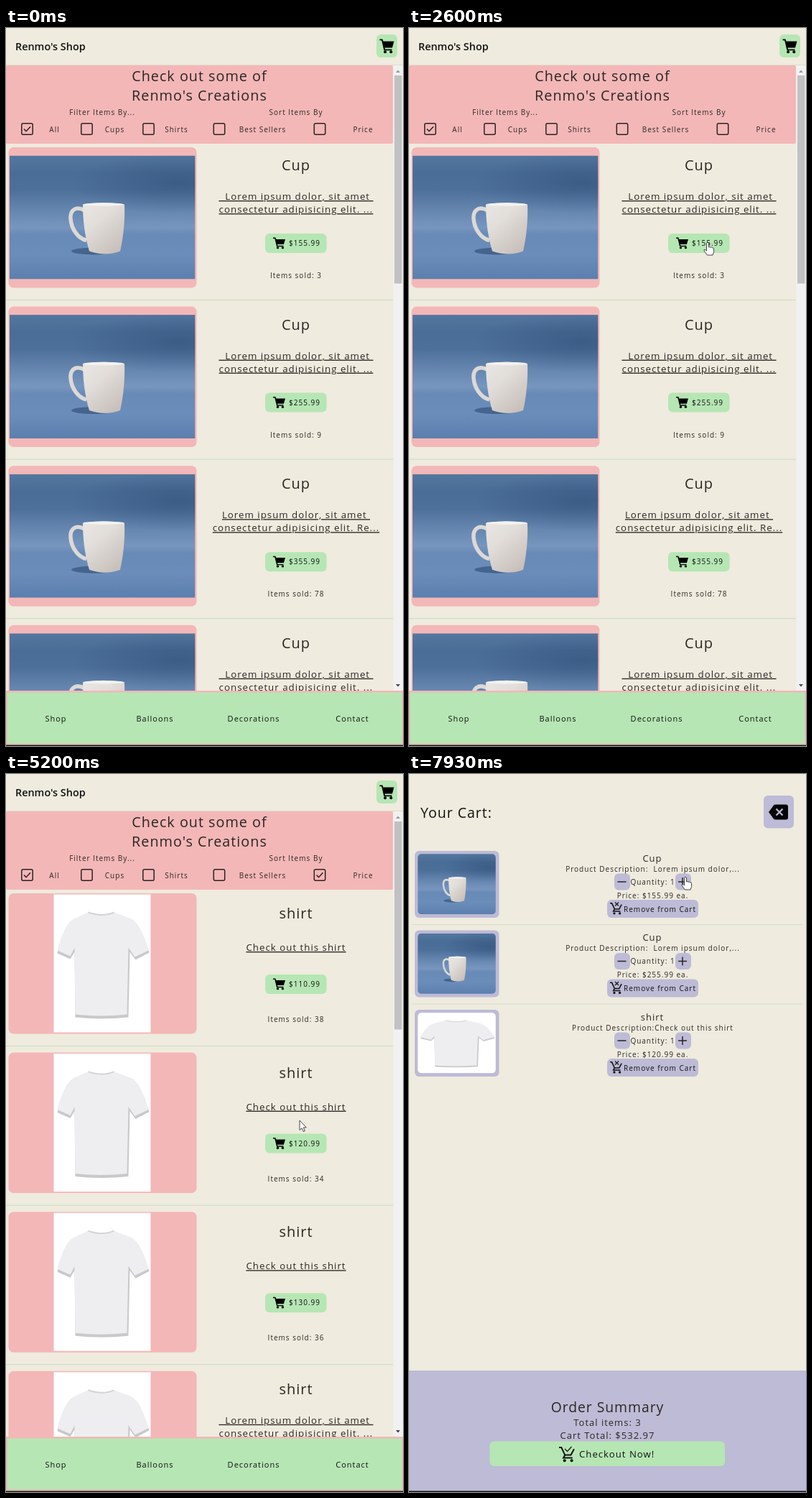
Write an HTML page that moves like this. It is 553 px wide and 999 px high and loops after 8 s.

```html
<!DOCTYPE html>
<html lang="en">
<head>
<meta charset="utf-8">
<title>Shop</title>
<style>
html, body { margin: 0; height: 100%; overflow: hidden; background: #efebde; }
svg { display: block; width: 100vw; height: 100vh; }
text { font-family: "Open Sans", "Noto Sans", sans-serif; fill: #2b2623; letter-spacing: 1px; white-space: pre; }
.u { text-decoration: underline; }
.dark { fill: #111; }
.line { fill: none; stroke: #2c2323; stroke-width: 1.5; }
</style>
</head>
<body>
<svg id="stage" viewBox="0 0 553 999" preserveAspectRatio="none">
  <defs>
    <linearGradient id="wall" x1="0" y1="0" x2="0" y2="1">
      <stop offset="0" stop-color="#54779f"/>
      <stop offset=".14" stop-color="#4a6d97"/>
      <stop offset=".28" stop-color="#4d709a"/>
      <stop offset=".45" stop-color="#6687b0"/>
      <stop offset=".58" stop-color="#7796bf"/>
      <stop offset=".64" stop-color="#688ab6"/>
      <stop offset=".8" stop-color="#6b8dba"/>
      <stop offset="1" stop-color="#5b7fae"/>
    </linearGradient>
    <radialGradient id="shade">
      <stop offset="0" stop-color="#27476f" stop-opacity=".45"/>
      <stop offset="1" stop-color="#27476f" stop-opacity="0"/>
    </radialGradient>
    <linearGradient id="mug" x2=".7" y2="1">
      <stop offset="0" stop-color="#e9e7e4"/>
      <stop offset=".4" stop-color="#e2deda"/>
      <stop offset="1" stop-color="#c8c0bb"/>
    </linearGradient>
    <clipPath id="photoEdge"><rect width="258.5" height="172"/></clipPath>

    <g id="cupPhoto" clip-path="url(#photoEdge)">
      <rect width="258.5" height="172" fill="url(#wall)"/>
      <ellipse cx="235" cy="38" rx="150" ry="42" fill="url(#shade)"/>
      <ellipse cx="118" cy="133" rx="32" ry="5" fill="#2c4a72" opacity=".6"/>
      <path d="M104 76C92 70 84 76 85 88c1 14 10 27 22 30" fill="none" stroke="#dcd9d6" stroke-width="5.5"/>
      <path d="M102 68q29-5 58 0c1 24-2 48-6 65q-20 8-43 0c-6-20-9-42-9-65z" fill="url(#mug)"/>
      <ellipse cx="131" cy="68" rx="28.5" ry="2.2" fill="#f3f2f0"/>
    </g>

    <g id="shirtPhoto">
      <rect width="135" height="192" fill="#fff"/>
      <path d="M48 26Q68 33 84 26L108 35C119 41 127 60 133 80L114 90 106 79 104 170Q66 174 30 170L29 79 23 89 5 81C10 60 17 41 28 35z" fill="#c9c9cc" transform="translate(0 1)"/>
      <path d="M48 25Q68 32 84 25L108 34C119 40 127 59 132 78L113 87 104 74 102 167Q66 171 30 167L29 74 23 86 5 78C10 59 17 40 28 34z" fill="#eeeef0"/>
      <path d="M48 25Q68 32 84 25" fill="none" stroke="#d4d4d8" stroke-width="2"/>
    </g>

    <g id="cart">
      <path d="M0 0h4l1 3h15l-2.5 9H7l.5 2H17v1.8H6L2.7 1.8H0z"/>
      <circle cx="7.6" cy="17.8" r="2"/><circle cx="15.8" cy="17.8" r="2"/>
    </g>

    <g id="cartLine" fill="none" stroke="#111" stroke-width="1.8">
      <path d="M0 1h3l4.5 9.5H15L19 3M7.5 10.5L5.5 14H17"/>
      <circle cx="7" cy="17.5" r="1"/><circle cx="16" cy="17.5" r="1"/>
    </g>
    <clipPath id="list"><rect y="51" width="553" height="872"/></clipPath>
  </defs>
  <g id="shop"></g>
  <g id="panel"></g>
  <rect y="997.5" width="553" height="1.5" fill="#111"/>
  <g id="pointer" stroke="#333" stroke-width=".9" fill="#fff" stroke-linejoin="round">
    <path id="arrow" d="M0 0v13.5l3.1-2.8 2.1 4.8 2.2-1-2.1-4.6h4z"/>
    <path id="hand" d="M-1.5 1.2Q0-.8 1.5 1.2V7Q3 5.8 4 7.3 5.5 6.3 6.4 7.9 8.3 7 8.6 9.3V13.5L7 18H-.5L-5 12Q-5.3 9.7-3 10.6L-1.5 12z"/>
  </g>
</svg>

<script>
const $ = id => document.getElementById(id);
const GREEN = '#b6e6b4', PINK = '#f3b7b7', LILAC = '#bdbbd6', CREAM = '#efebde';
const PITCH = 221.6;

const rect = (x, y, w, h, fill, r = 0) =>
  `<rect x="${x}" y="${y}" width="${w}" height="${h}" rx="${r}" fill="${fill}"/>`;
const text = (x, y, s, size = 10, attrs = '') =>
  `<text x="${x + .5}" y="${y}" font-size="${size}" text-anchor="middle" ${attrs}>${s}</text>`;
const left = (x, y, s, size, attrs = '') =>
  `<text x="${x}" y="${y}" font-size="${size}" ${attrs}>${s}</text>`;
const use = (id, x, y, sx = 1, sy = sx) =>
  `<use href="#${id}" transform="translate(${x} ${y}) scale(${sx} ${sy})"/>`;
const path = d => `<path class="line" d="${d}"/>`;

function blurb(y, long) {
  const sp = '\u00a0';
  const first = (long ? '' : sp + sp) + 'Lorem ipsum dolor, sit amet' + sp;
  const second = 'consectetur adipisicing elit. ' + (long ? 'Re...' : '...');
  return text(403.5, y, first, 13.3, 'class="u"') + text(403.5, y + 18, second, 13.3, 'class="u"');
}

function item(i, kind, price, sold, short) {
  const photo = kind === 'Cup' ? use('cupPhoto', 5, 11.5) : use('shirtPhoto', 66.5, 1.5);
  const buy = short ? 113 : 120;
  return `<g transform="translate(0 ${166 + i * PITCH})">`
    + rect(3.5, 0, 262, 195.5, PINK, 7) + photo
    + text(403.5, short ? 35 : 32, kind, 20)
    + (short ? text(403.5, 80, 'Check out this shirt', 13.3, 'class="u"') : blurb(73, price === 355.99))
    + rect(361, buy, 85.5, 27, GREEN, 6) + use('cart', 372, buy + 5.5, .85, .8)
    + text(415.5, buy + 17, '$' + price, 10, 'class="dark"')
    + text(403.5, short ? 179 : 182, 'Items sold: ' + sold)
    + rect(0, 212, 539, 1, '#c6dfc1') + '</g>';
}

const box = x => `<rect class="line" x="${x - 7.7}" y="132.8" width="15.4" height="15.4" rx="2"/>`;
const check = x => path(`M${x - 4.5} 140.5l3 3.2 6-6.5`);

function shopView() {
  const labels = [[29.5, 'All', 67], [112.5, 'Cups', 151], [198.5, 'Shirts', 237],
    [297, 'Best Sellers', 357], [437, 'Price', 497]];
  const menu = [['Shop', 69], ['Balloons', 207], ['Decorations', 344.5], ['Contact', 482]];
  const cups = item(0, 'Cup', 155.99, 3) + item(1, 'Cup', 255.99, 9)
    + item(2, 'Cup', 355.99, 78) + item(3, 'Cup', 455.99, 12);
  const shirts = item(0, 'shirt', 110.99, 38, true) + item(1, 'shirt', 120.99, 34, true)
    + item(2, 'shirt', 130.99, 36, true) + item(3, 'shirt', 140.99, 20);
  return rect(0, 0, 553, 999, CREAM)
    + left(13, 31, "Renmo's Shop", 14.4, 'class="dark" style="letter-spacing:0;font-weight:600"')
    + rect(516, 9, 29, 32, GREEN, 6) + use('cart', 520.5, 15.5)
    + rect(0, 51, 553, 1, '#e2dccf')
    + `<g clip-path="url(#list)"><g id="byDefault">${cups}</g><g id="byPrice">${shirts}</g></g>`
    + rect(0, 52, 539, 109, PINK, 2)
    + text(269, 74, 'Check out some of', 19.8) + text(269, 101, "Renmo's Creations", 19.8)
    + text(133.5, 121, 'Filter Items By...') + text(403.5, 121, 'Sort Items By')
    + labels.map(([x, s, cx]) => box(x) + text(cx, 145, s)).join('')
    + check(29.5) + `<g id="priceCheck">${check(437)}</g>`
    + rect(539.5, 52, 13.5, 871, '#f1f1f1') + rect(541, 66, 10.5, 289.5, '#c1c1c1')
    + '<path d="M543 62h6l-3-3.5z" fill="#999"/><path d="M543 913h6l-3 3.5z" fill="#444"/>'
    + rect(0, 922, 553, 75, PINK) + rect(1.5, 924.5, 550, 71, GREEN)
    + menu.map(([s, x]) => text(x, 965, s, 11, 'class="dark"')).join('');
}

function cartRow(i, kind, price) {
  const isCup = kind === 'Cup';
  const photo = isCup ? use('cupPhoto', 12, 4, 109 / 258.5, 84.5 / 172)
    : use('shirtPhoto', 12, 4, 109 / 135, 84.5 / 192);
  const about = 'Product Description:' + (isCup ? '\u00a0 Lorem ipsum dolor,...' : 'Check out this shirt');
  return `<g transform="translate(0 ${107 + i * 110.5})">`
    + rect(8, 0, 117.5, 93, LILAC, 6) + photo
    + `<rect x="11" y="3" width="111" height="86.5" rx="6" fill="none" stroke="${LILAC}" stroke-width="2.5"/>`
    + text(338.5, 14.5, kind, 13) + text(339, 28.5, about)
    + rect(286, 31.5, 22, 23, LILAC, 6) + rect(371, 31.5, 22, 23, LILAC, 6)
    + path('M290.5 43h12M375 43h12M381 37v12') + text(339, 46.5, 'Quantity: 1')
    + text(339, 65.5, `Price: $${price} ea.`)
    + rect(276, 68, 127, 25, LILAC, 6) + use('cartLine', 280, 72, .85)
    + path('M287 71.5l5 5m0-5l-5 5') + text(349, 84.5, 'Remove from Cart', 10, 'class="dark"')
    + (i < 2 ? rect(4, 102, 545, 1, '#d5dccb') : '') + '</g>';
}

function panelView() {
  return rect(0, -2, 553, 1001, CREAM)
    + left(16, 61, 'Your Cart:', 19.5, 'class="dark"')
    + rect(494, 30, 42, 45.5, LILAC, 6)
    + '<path d="M501 53l7-9.5q1-1 2.5-1H525q3 0 3 3v15q0 3-3 3h-14.5q-1.5 0-2.5-1z" fill="#050505"/>'
    + `<path d="M511.5 48.5l9 9m0-9l-9 9" stroke="${LILAC}" stroke-width="2.2"/>`
    + `<g id="empty">${text(275.5, 473, 'Cart is Empty!', 19.5, 'class="dark"')}</g>`
    + '<g id="filled">'
    + cartRow(0, 'Cup', 155.99) + cartRow(1, 'Cup', 255.99) + cartRow(2, 'shirt', 120.99)
    + rect(0, 830, 553, 169, LILAC)
    + text(276, 888, 'Order Summary', 19.3) + text(276, 907, 'Total items: 3', 13)
    + text(276, 925, 'Cart Total: $532.97', 13)
    + rect(112.5, 928.5, 327.5, 34.5, GREEN, 6) + use('cartLine', 209, 936, 1.1)
    + path('M217 939l3.5 3.5 6-6.5') + left(237, 951, 'Checkout Now!', 13.2, 'class="dark"')
    + '</g>';
}

$('shop').innerHTML = shopView();
$('panel').innerHTML = panelView();

// CSS "ease" curve, solved by bisection
function ease(p) {
  if (p <= 0 || p >= 1) return Math.min(1, Math.max(0, p));
  const bez = (a, b, s) => 3 * a * s * (1 - s) ** 2 + 3 * b * s * s * (1 - s) + s ** 3;
  let lo = 0, hi = 1;
  for (let i = 0; i < 20; i++) {
    const mid = (lo + hi) / 2;
    if (bez(.25, .25, mid) < p) lo = mid; else hi = mid;
  }
  return bez(.1, 1, lo);
}

// Pointer tip: time, x, y
const route = [[520, 556, 190], [910, 528, 26], [1300, 528, 26], [1690, 513, 55], [1820, 512, 60],
  [1950, 512, 73], [2340, 417, 296], [2860, 415, 300], [3250, 420, 480], [3510, 421, 501],
  [3640, 418, 516], [3770, 418, 518], [4290, 437, 142], [4550, 437, 142], [5200, 409, 482],
  [5330, 406, 508], [5590, 406, 512], [6240, 533, 34], [6370, 534, 35], [6760, 533, 34],
  [7280, 385, 143], [8000, 385, 143]];
const handTimes = [[800, 1400], [1600, 1900], [2300, 2950], [3600, 3850], [4250, 4620],
  [5300, 5650], [6200, 6800], [7200, 8000]];

function tipAt(t) {
  const i = Math.max(1, route.findIndex(k => k[0] >= t));
  const [a, b] = [route[i - 1], route[i]];
  const p = Math.max(0, (t - a[0]) / (b[0] - a[0]));
  const s = p * p * (3 - 2 * p);
  return [a[1] + (b[1] - a[1]) * s, a[2] + (b[2] - a[2]) * s];
}

const show = (id, on) => $(id).setAttribute('display', on ? 'inline' : 'none');

function draw(t) {
  const slide = start => ease((t - start) / 500);
  const open = slide(910) - slide(1827) + slide(6630);
  show('panel', open > 0);
  $('panel').setAttribute('transform', `translate(0 ${999 * (1 - open)})`);
  show('empty', t < 2400);
  show('filled', t >= 2400);

  const sorted = t >= 4550;
  show('byDefault', !sorted);
  show('byPrice', sorted);
  show('priceCheck', sorted);

  const hand = handTimes.some(([a, b]) => t >= a && t < b);
  show('pointer', t >= 520);
  show('hand', hand);
  show('arrow', !hand);
  $('pointer').setAttribute('transform', `translate(${tipAt(t)})`);
}

const STEP = 130, LOOP = 8000;
function frame(now) {
  draw(Math.floor(now % LOOP / STEP) * STEP);
  requestAnimationFrame(frame);
}
frame(performance.now());
</script>
</body>
</html>
```
